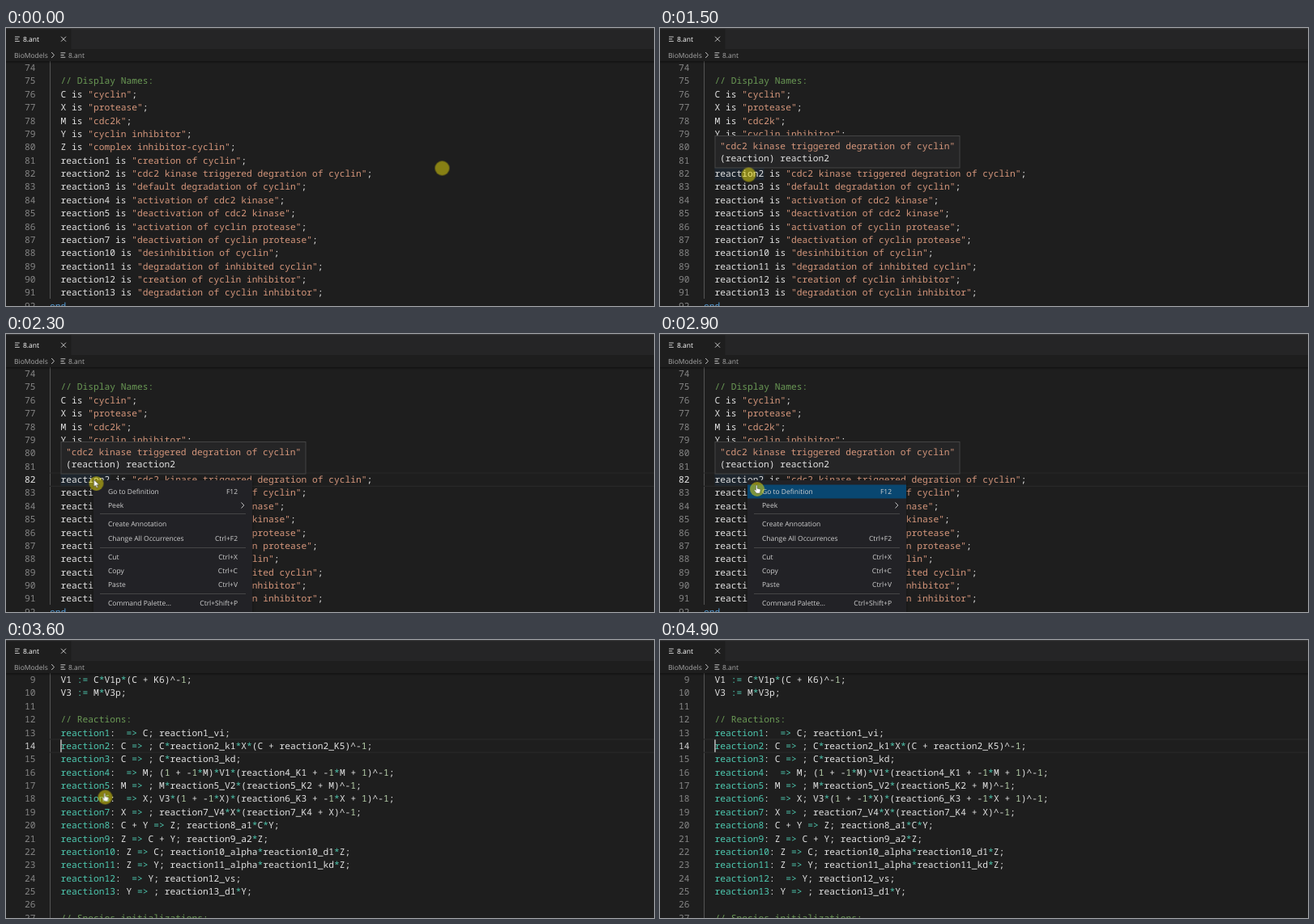
Recreate the animation shown at these times as an HTML page. Size 800 px wide and 344 px high, loop 5000 ms.

```html
<!DOCTYPE html>
<html lang="en">
<head>
<meta charset="utf-8">
<title>Go to definition</title>
<style>
html, body { margin: 0; width: 100%; height: 100%; overflow: hidden; background: #1e1e1e; }
svg { display: block; width: 800px; height: 344px; }
text { white-space: pre; text-rendering: geometricPrecision; }
.code text { font: 11.25px "Noto Sans Mono", monospace; fill: #e2e2e2; }
.ui text { font: 8.5px "Open Sans", sans-serif; fill: #d0d0d0; }
.code .num { fill: #858585; text-anchor: end; }
.code .on { fill: #d0d0d0; }
.comment { fill: #6a9955; }
.code .string { fill: #d6977c; }
.op { fill: #4ec9b0; }
.digit { fill: #b5cea8; }
.word { fill: #569cd6; }
.ui .dim { fill: #a9a9a9; }
.ui .title { fill: #fff; }
.end { text-anchor: end; }
.row { fill: none; stroke: #282828; stroke-width: 1.2; }
.line { fill: none; stroke: #c5c5c5; stroke-width: 1; }
.guide { stroke: #545454; }

.anim { animation: 5s step-end infinite; }
#names { animation-name: names; }
#model { animation-name: model; }
#current { animation-name: current; }
#caretA { animation-name: caretA; }
#caretB { animation-name: caretB; }
#popup, #word { animation-name: popup; }
#menu { animation-name: menu; }
#hover { animation-name: hover; }
#arrow { animation-name: arrow; }
#hand { animation-name: hand; }
#pointer { animation-name: move; }

@keyframes names { 0% { visibility: visible } 72%, 100% { visibility: hidden } }
@keyframes model { 0% { visibility: hidden } 72%, 100% { visibility: visible } }
@keyframes current { 0% { opacity: 0 } 38%, 100% { opacity: 1 } }
@keyframes caretA { 0% { opacity: 0 } 66% { opacity: 1 } 72%, 100% { opacity: 0 } }
@keyframes caretB { 0% { opacity: 0 } 72% { opacity: 1 } 78% { opacity: 0 } 86% { opacity: 1 } 92% { opacity: 0 } 98%, 100% { opacity: 1 } }
@keyframes popup { 0% { opacity: 0 } 28% { opacity: 1 } 66%, 100% { opacity: 0 } }
@keyframes menu { 0% { opacity: 0 } 38% { opacity: 1 } 66%, 100% { opacity: 0 } }
@keyframes hover { 0% { opacity: 0 } 58% { opacity: 1 } 66%, 100% { opacity: 0 } }
@keyframes arrow { 0% { opacity: 0 } 36% { opacity: 1 } 58%, 100% { opacity: 0 } }
@keyframes hand { 0% { opacity: 0 } 58% { opacity: 1 } 86%, 100% { opacity: 0 } }
@keyframes move {
  0% { transform: translate(538.5px, 173.5px) }
  2% { transform: translate(100px, 256px) }
  6% { transform: translate(86px, 320px) }
  8% { transform: translate(420px, 250px) }
  10% { transform: translate(505px, 75px) }
  12% { transform: translate(260px, 155px) }
  16% { transform: translate(185px, 163px) }
  18% { transform: translate(137px, 171px) }
  20% { transform: translate(129px, 173px) }
  22% { transform: translate(127px, 174px) }
  26% { transform: translate(116px, 179px) }
  28% { transform: translate(109.5px, 181.5px) }
  36% { transform: translate(111.5px, 185px) }
  56% { transform: translate(115px, 188px) }
  58% { transform: translate(120px, 192px) }
  60% { transform: translate(122.5px, 194.5px) }
  86% { transform: translate(180px, 190px) }
  88% { transform: translate(420px, 165px) }
  90% { transform: translate(742px, 131px) }
  92%, 100% { transform: translate(840px, 110px) }
}
</style>
</head>
<body>
<svg viewBox="0 0 800 344">
  <defs>
    <linearGradient id="shade" x2="0" y2="1">
      <stop stop-color="#000" stop-opacity=".4"/>
      <stop offset="1" stop-color="#000" stop-opacity="0"/>
    </linearGradient>
    <filter id="drop" x="-10%" y="-10%" width="120%" height="120%">
      <feDropShadow dx="0" dy="1" stdDeviation="2" flood-color="#000" flood-opacity=".4"/>
    </filter>
    <path id="file" class="line" d="M0 .5h5.800M0 3.200h4.200M0 5.900h5.800"/>
  </defs>

  <g class="code">
    <g id="names" class="anim">
      <path class="guide" d="M54.500 41V335"/>
      <rect id="word" class="anim" x="67.500" y="172" width="61" height="16.400" fill="#264f78" fill-opacity=".18"/>
      <g id="namesText"></g>
      <g id="current" class="anim">
        <path class="row" d="M54 172H800M54 188.400H800"/>
        <text class="num on" x="36.500" y="184.040">82</text>
      </g>
      <rect id="caretA" class="anim" x="107.800" y="172.500" width="1.300" height="15.500" fill="#d8d8d8"/>
    </g>
    <g id="model" class="anim">
      <path class="guide" d="M54.500 41V344"/>
      <path class="row" d="M54 122.800H800M54 139.200H800"/>
      <g id="modelText"></g>
      <rect id="caretB" class="anim" x="67.300" y="123.300" width="1.300" height="15.500" fill="#d8d8d8"/>
    </g>
    <g id="popup" class="anim">
      <rect x="68" y="133.500" width="302" height="39.500" fill="#252526" stroke="#454545"/>
      <text class="string" x="74" y="149.500">"cdc2 kinase triggered degration of cyclin"</text>
      <text x="74" y="165.300">(reaction) reaction2</text>
    </g>
  </g>

  <g class="ui">
    <rect width="800" height="41" fill="#1e1e1e"/>
    <rect y="41" width="800" height="3" fill="url(#shade)"/>
    <rect x="80.500" width="720" height="26" fill="#252526"/>
    <rect width="800" height="1.200" fill="#363637"/>
    <use href="#file" x="11" y="10.500"/>
    <text class="title" x="21" y="17">8.ant</text>
    <path class="line" d="M68 10.700l6 6m0-6l-6 6"/>
    <text class="dim" x="10" y="36.700">BioModels</text>
    <path class="line" d="M56.200 30l3.300 3.500-3.300 3.500"/>
    <use href="#file" x="67.500" y="30.300"/>
    <text class="dim" x="77" y="36.700">8.ant</text>

    <g id="menu" class="anim">
      <rect x="108" y="181" width="196" height="170" fill="#242425" filter="url(#drop)"/>
      <rect id="hover" class="anim" x="108" y="186.500" width="196" height="17" fill="#094771"/>
      <g id="items"></g>
      <path class="line" d="M290.500 208.500l3.300 3.500-3.300 3.500"/>
      <path d="M116 222.500H296M116 264.500H296M116 321.500H296" stroke="#454546"/>
    </g>
  </g>

  <g id="pointer" class="anim">
    <circle r="9" fill="#f0e10a" fill-opacity=".5"/>
    <path id="arrow" class="anim" d="M-3-4.800V4.200L-.900 2.300.500 5.500 2 4.800.700 1.700H3.500Z" fill="#fff" stroke="#222" stroke-width=".5"/>
    <path id="hand" class="anim" d="M-1.500-4.500q.8-.8 1.500 0V-.800L3.300 0Q4.200.300 4 1.500L3.200 5H-1L-3.600 1.400Q-3.600.200-2.500.700L-1.500 1.600Z" fill="#fff" stroke="#333" stroke-width=".4"/>
  </g>
</svg>

<script>
const names = `
// Display Names:
C is "cyclin";
X is "protease";
M is "cdc2k";
Y is "cyclin inhibitor";
Z is "complex inhibitor-cyclin";
reaction1 is "creation of cyclin";
reaction2 is "cdc2 kinase triggered degration of cyclin";
reaction3 is "default degradation of cyclin";
reaction4 is "activation of cdc2 kinase";
reaction5 is "deactivation of cdc2 kinase";
reaction6 is "activation of cyclin protease";
reaction7 is "deactivation of cyclin protease";
reaction10 is "desinhibition of cyclin";
reaction11 is "degradation of inhibited cyclin";
reaction12 is "creation of cyclin inhibitor";
reaction13 is "degradation of cyclin inhibitor";
end`;

const model = `V1 := C*V1p*(C + K6)^-1;
V3 := M*V3p;

// Reactions:
reaction1:  => C; reaction1_vi;
reaction2: C => ; C*reaction2_k1*X*(C + reaction2_K5)^-1;
reaction3: C => ; C*reaction3_kd;
reaction4:  => M; (1 + -1*M)*V1*(reaction4_K1 + -1*M + 1)^-1;
reaction5: M => ; M*reaction5_V2*(reaction5_K2 + M)^-1;
reaction6:  => X; V3*(1 + -1*X)*(reaction6_K3 + -1*X + 1)^-1;
reaction7: X => ; reaction7_V4*X*(reaction7_K4 + X)^-1;
reaction8: C + Y => Z; reaction8_a1*C*Y;
reaction9: Z => C + Y; reaction9_a2*Z;
reaction10: Z => C; reaction10_alpha*reaction10_d1*Z;
reaction11: Z => Y; reaction11_alpha*reaction11_kd*Z;
reaction12:  => Y; reaction12_vs;
reaction13: Y => ; reaction13_d1*Y;

// Species initializations:`;

const menu = [
  ["Go to Definition", "F12", 195], ["Peek", "", 212],
  ["Create Annotation", "", 235], ["Change All Occurrences", "Ctrl+F2", 252.5],
  ["Cut", "Ctrl+X", 275.5], ["Copy", "Ctrl+C", 293], ["Paste", "Ctrl+V", 310],
  ["Command Palette...", "Ctrl+Shift+P", 333]
];

const $ = id => document.getElementById(id);

function add(parent, tag, content, attrs) {
  const el = document.createElementNS("http://www.w3.org/2000/svg", tag);
  for (const key in attrs) el.setAttribute(key, attrs[key]);
  el.textContent = content;
  return parent.appendChild(el);
}

const tokens = /(\/\/.*)|(".*?")|(^reaction\d+(?=:)|:=|=>|\*)|(\b\d+\b)|(\bend\b)/g;
const kinds = ["comment", "string", "op", "digit", "word"];

function paint(parent, source, first, active) {
  source.split("\n").forEach((line, i) => {
    const y = 53 + i * 16.38;
    const n = first + i;
    add(parent, "text", n, { x: 36.5, y, class: n === active ? "num on" : "num" });
    const row = add(parent, "text", "", { x: line === "end" ? 54 : 67.4, y });
    let at = 0;
    for (const m of line.matchAll(tokens)) {
      add(row, "tspan", line.slice(at, m.index), {});
      add(row, "tspan", m[0], { class: kinds[m.slice(1).findIndex(Boolean)] });
      at = m.index + m[0].length;
    }
    add(row, "tspan", line.slice(at), {});
  });
}

paint($("namesText"), names, 74);
paint($("modelText"), model, 9, 14);
for (const [label, keys, y] of menu) {
  add($("items"), "text", label, { x: 126, y: y + 3 });
  add($("items"), "text", keys, { x: 286, y: y + 3, class: "end" });
}
</script>
</body>
</html>
```
